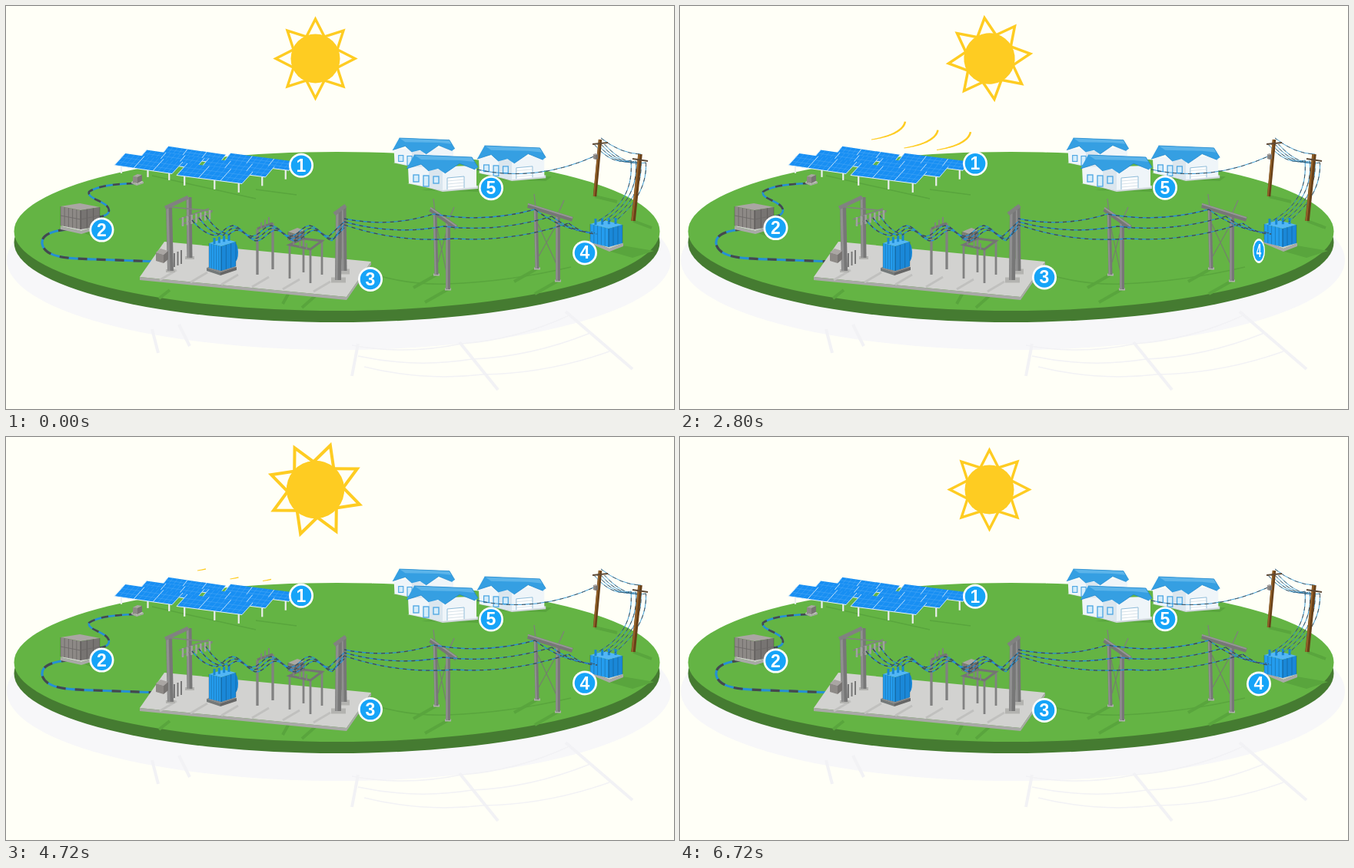
An HTML page that plays this animation: 869 by 525 pixels, repeating every 6800 ms.

```html
<!DOCTYPE html>
<html lang="en">
<head>
<meta charset="utf-8">
<title>Solar power from panel to home</title>
<style>
html,body{margin:0;width:100%;height:100%;overflow:hidden;background:#fffff7}
svg{display:block;width:100vw;height:100vh}
text{font:bold 23px "Liberation Sans",Arial,sans-serif;fill:#fff;text-anchor:middle}
</style>
</head>
<body>
<svg id="stage" viewBox="0 0 869 525"></svg>
<script>
const out = [];
const add = s => out.push(s);
const poly = (fill, pts) => add(`<polygon points="${pts}" fill="${fill}"/>`);
const line = (stroke, w, d, extra = '') => add(`<path d="${d}" fill="none" stroke="${stroke}" stroke-width="${w}" ${extra}/>`);
const oval = (fill, cx, cy, rx, ry) => add(`<ellipse cx="${cx}" cy="${cy}" rx="${rx}" ry="${ry}" fill="${fill}"/>`);
const mix = (a, b, k) => a.map((v, i) => v + (b[i] - v) * k);
const shift = (p, x, y) => [p[0] + x, p[1] + y];
const times = (n, f) => Array.from({length: n}, (_, i) => f(i));
const clamp = v => Math.min(1, Math.max(0, v));

const steel = ['#aaa6a3', '#8d8986', '#777472'];
const slab = ['#d2d2d0', '#a9a9a7', '#a9a9a7'];
const bright = ['#52b6f5', '#249def', '#1a88d8'];
const frame = '#818181', grass = '#59a53d', pale = '#f2f2f5', gold = '#fecc22';

// n upright strokes of height h spread evenly from a to b
function comb(stroke, w, a, b, n, h) {
  line(stroke, w, times(n, i => `M${mix(a, b, i / (n - 1))}v${h}`).join(''));
}

// Post with a lit left side
function post(top, foot, w, dark = '#777', light = '#909090') {
  line(dark, w, `M${top}L${foot}`);
  line(light, w * .4, `M${shift(top, -w / 4, 0)}L${shift(foot, -w / 4, 0)}`);
}

// Box seen from a corner: left, front and right points of its top, and height
function box(l, f, r, h, [top, left, right]) {
  const low = p => shift(p, 0, h);
  poly(top, [l, f, r, shift(l, r[0] - f[0], r[1] - f[1])]);
  poly(left, [l, f, low(f), low(l)]);
  poly(right, [f, r, low(r), low(f)]);
}

// Box with upright fins and terminals on top
function finned(l, f, r, h, colors, pins) {
  box(l, f, r, h, colors);
  comb('#0003', 1, l, f, 6, h);
  comb('#0003', 1, f, r, 4, h);
  if (pins) comb('#1886d2', 3, shift(l, 7, 1), shift(r, -9, -1), pins, -8);
}

// Cable of blue and dark pieces that travel along it
function cable(d, w = 1.3, dash = 5) {
  line('#2590d4', w, d);
  line('#45494b', w, d, `class="flow" data-dash="${dash}" stroke-dasharray="${dash}"`);
}

function hang(points, sag) {
  return `M${points[0]}` + points.slice(1).map((p, i) => `Q${shift(mix(points[i], p, .5), 0, sag)} ${p}`).join('');
}

// Mirror image and shadow below the disc
oval('#f7f7f9', 433, 331, 432, 117);
for (const [x, y, dx, dy] of [[190, 421, 8, 31], [225, 415, 14, 28], [458, 440, -8, 42], [590, 438, 50, 62], [728, 398, 87, 75]])
  line(pale, 4, `M${x} ${y}l${dx} ${dy}`);
for (const i of [0, 1, 2])
  line(pale, 1.5, hang([[450 + 8 * i, 442 + 14 * i], [592 + 14 * i, 440 + 20 * i], [735 + 25 * i, 402 + 24 * i]], 14));

// Disc
oval('#457b31', 430.5, 308, 420, 104);
oval('#64b444', 430.5, 293.5, 420, 103.5);
line(grass, 1.5, hang([[480, 350], [575, 362], [735, 340]], 8) + 'M190 221L325 251M325 239L378 246');
poly(grass, '97 294 122 286 139 292 117 302');
poly(grass, '780 318 802 312 843 319 815 328');
line(grass, 4, 'M816 280l24 9M766 248l29 7M213 370l-14 11M370 370l-10 18M402 378l-17 15');

// Houses
function house(x, y, k) {
  add(`<g transform="translate(${x} ${y}) scale(${k})">`);
  poly(grass, '20 46 94 48 102 42 60 40');
  poly('#cfd6da', '2 37 30 43 48 48 94 44 94 40 40 36');
  poly('#eff5f9', '3 16 92 14 92 42 48 46 30 42 4 37');
  poly('#dbe6ee', '30 18 48 20 48 46 30 42');
  poly('#359fe2', '11 0 86 3 94 16 90 19 70 11 51 24 42 18 30 21 20 12 1 18');
  poly('#5bb4ea', '11 0 86 3 90 9 70 7 20 6');
  line('#1e86cc', .8, 'M11 0L86 3L94 16M1 18L20 12L30 21M51 24L70 11L90 19');
  for (const i of [0, 1, 2])
    add(`<rect x="${10 + 13 * i}" y="${26 + i}" width="7" height="${i === 1 ? 14 : 9}" fill="#d5edfb" stroke="#4aa5e2" stroke-width="1.3"/>`);
  poly('#fff', '54 30 76 28 76 43 54 45');
  line('#8dbbd8', 1, 'M54 45V30L76 28V43');
  for (const i of [1, 2, 3]) line('#c4d5de', .7, `M54 ${30 + 4 * i}l22 -2`);
  add('</g>');
}
house(502, 172, .87);
house(612, 182, .96);
house(520, 194, 1);

// Solar field: three rows of two tables
function panelTable(row, col) {
  const tl = [155 + 28 * row + 81 * col, 192 - 4.6 * row + (13 - 2 * row) * col];
  const tr = shift(tl, 75 + 10 * col, 11), side = [2.5 * row - 14, 15.5 - 2 * row];
  const bl = shift(tl, ...side), br = shift(tr, ...side);
  for (const k of [.12, .58, .95]) line('#eceeee', 2.2, `M${mix(bl, br, k)}v${9 + 3 * col}`);
  poly('#188ff3', [tl, tr, br, bl]);
  for (let i = 0; i <= 12; i++) {
    const seam = i % 4 === 0;
    line(seam ? '#c9e5fb' : '#4ea9f5', seam ? 1 : .5, `M${mix(tl, tr, i / 12)}L${mix(bl, br, i / 12)}`);
  }
  for (const k of [.33, .66]) line('#4ea9f5', .5, `M${mix(tl, bl, k)}L${mix(tr, br, k)}`);
  line('#e4f1fa', 1, `M${bl}L${br}`);
}
for (const row of [2, 1, 0]) for (const col of [0, 1]) panelTable(row, col);

// Collector boxes and ground cable
cable('M166 231C142 232 120 234 108 242C105 252 133 254 134 266C134 272 128 274 120 275', 2.6, 9);
cable('M80 291C55 293 43 301 48 313C55 329 86 329 115 330L198 333', 3.2, 12);
box([163, 229], [170, 232], [179, 229], 2, slab);
box([165, 222], [171, 223], [177, 220], 8, steel);
box([71, 287], [98, 293], [124, 285], 4, slab);
finned([71, 261], [97, 266], [122, 262], 25, steel);
line('#6b6866', .8, 'M71 273L97 278L122 273');

// Substation pad
box([174, 353], [443, 379], [475, 333], 4, slab);
for (let i = 0; i < 6; i++) line('#c0c0be', 3, `M${222 + 40 * i} ${344 + 3 * i}l-22 13`);

// Entry gantry
line('#b2b2af', 4, 'M208 345h12M233 328h12');
post([238, 249], [239, 328], 7);
post([212, 260], [214, 345], 8);
line(frame, 5, 'M207 263L237 249');
line(frame, 1.5, 'M214 262L269 267M225 278L264 264M228 285L268 268');
comb('#a0a0a0', 2.5, [230, 275], [265, 266], 7, 12);
comb('#777', 2, [219, 322], [228, 318], 3, 18);
box([195, 321], [205, 324], [211, 319], 11, steel);

// Main transformer
box([261, 341], [279, 347], [300, 340], 4, ['#888', '#747979', '#666']);
oval('#1787d8', 298, 321, 4, 12);
finned([264, 309], [280, 313], [299, 307], 32, bright, 4);

// Switch frames: four legs under a rectangular beam
function table(a, b, c, d, legs) {
  for (const p of [d, a, c, b]) line(frame, 2.8, `M${p}v${legs}`);
  line('#747474', 3, `M${[a, b, c, d].join('L')}Z`);
  comb(frame, 1.8, shift(a, 5, 0), shift(b, -5, 0), 3, -8);
}
table([327, 290], [347, 283], [347, 283], [327, 290], 60);
table([369, 311], [396, 317], [411, 306], [387, 303], 44);
finned([367, 294], [376, 297], [388, 292], 11, steel);

// Line gantries
line('#b3b3b0', 7, 'M423 357h19M431 346h16');
post([439, 261], [440, 345], 7);
post([433, 267], [432, 357], 8);
line(frame, 5, 'M427 271L442 260');
function gantry(a, b, depth) {
  const footA = shift(a, 2, depth), footB = shift(b, 0, depth + 7);
  for (const foot of [footA, footB]) {
    line(grass, 4, `M${foot}l-30 17`);
    line('#b0b0ad', 3, `M${shift(foot, -4, 0)}h8`);
  }
  line('#74806d', 1.2, `M${shift(a, 3, 22)}L${shift(footB, -2, -22)}M${shift(b, -2, 14)}L${shift(footA, 2, -16)}`);
  line('#7d827a', 1.3, `M${a}l-2 -17M${b}l8 -18`);
  post(a, footA, 5);
  post(b, footB, 6);
  const ends = [mix(a, b, -.35), mix(a, b, 1.65)].map(p => shift(p, 0, 1));
  line('#767676', 6, `M${ends[0]}L${ends[1]}`);
  line('#979797', 2, `M${shift(ends[0], 0, -2)}L${shift(ends[1], 0, -2)}`);
}
gantry([558, 268], [575, 280], 82);
gantry([689, 262], [718, 271], 80);

// Step-down transformer
box([759, 305], [785, 316], [803, 309], 4, slab);
finned([760, 284], [784, 290], [802, 285], 24, bright, 4);

// Overhead lines, three in parallel
for (const i of [0, 1, 2]) {
  cable(hang([[440, 277 + 4 * i], [556 + 13 * i, 271 + 16 * i], [688 + 22 * i, 265 + 9 * i]], 15));
  cable(hang([[688 + 22 * i, 265 + 9 * i], [763 + 3 * i, 295 + i]], 13 - 3 * i));
  cable(hang([[242 + 9 * i, 279 - 3 * i], [275 + 7 * i, 299 - i]], 10));
  const wave = times(30, n => {
    const x = 275 + 7 * i + 5 * n;
    return [x, 293 + 3 * i + 7 * Math.cos((x - 320 - 3 * i) * Math.PI / 25)];
  }).filter(p => p[0] < 428);
  cable(`M${wave.join('L')}L440 ${281 + 4 * i}`);
}

// Service lines between poles and houses
for (const i of [0, 1, 2, 3]) {
  const top = [813 + 6.5 * i, 201 + i];
  cable(`M${top}C${816 + 6 * i} 240 ${800 + 4 * i} 264 ${768 + 8 * i} 281`, .9);
  cable(hang([[765 + 4.5 * i, 180], top], 18), .8);
}
cable(hang([[774, 172], [826, 193]], 10), .8);
cable(hang([[613, 213], [767, 195]], 26), .9);

// Wooden poles
function woodPole(top, foot, w, tilt) {
  post(top, foot, w, '#684018', '#94622a');
  line('#5e4a36', 1.8, `M${shift(top, -10, 6)}l20 ${tilt}`);
}
woodPole([773, 174], [766, 248], 4.5, -2);
woodPole([825, 193], [816, 280], 5.5, 3);
box([764, 193], [767, 194], [770, 193], 6, steel);

// Sun
add('<g id="sun">');
for (let a = 0; a < 360; a += 45)
  line(gold, 3.4, 'M-12 -28L0 -51.5L12 -28', `transform="rotate(${a})"`);
add(`<circle r="32" fill="${gold}"/></g>`);

// Heat rays
add('<path id="guide" fill="none" d="M337 116C308 118 290 130 293 146C295 161 275 170 249 174"/>');
for (const [x, y] of [[0, 0], [42.5, 11], [85, 13.5]])
  add(`<path class="ray" fill="${gold}" transform="translate(${x} ${y})"/>`);

// Number badges
const spots = [[384, 206.8], [124.5, 290.6], [474, 355], [753, 320.5], [631, 235.7]];
spots.forEach((_, i) => add(`<g class="badge"><circle r="16" fill="#fff"/><circle r="13.3" fill="#16a4f8"/><text y="8">${i + 1}</text></g>`));

const stage = document.getElementById('stage');
stage.innerHTML = out.join('');
const all = s => [...stage.querySelectorAll(s)];
const [sun] = all('#sun'), [guide] = all('#guide');
const flows = all('.flow'), rays = all('.ray'), badges = all('.badge');
const reach = guide.getTotalLength();

// Stretch of the guide between two fractions, thick in the middle of the guide
function rayShape(tail, head) {
  if (head - tail < .01) return '';
  const left = [], right = [];
  for (let i = 0; i <= 30; i++) {
    const u = tail + (head - tail) * i / 30;
    const at = d => guide.getPointAtLength(u * reach + d);
    const p = at(0), a = at(-1), b = at(1);
    const w = (.45 + .85 * Math.sin(Math.PI * u)) / Math.hypot(b.x - a.x, b.y - a.y);
    const dx = (a.y - b.y) * w, dy = (b.x - a.x) * w;
    left.push([p.x + dx, p.y + dy]);
    right.unshift([p.x - dx, p.y - dy]);
  }
  return `M${left.concat(right).join('L')}Z`;
}

function draw(t) {
  // The sun swells during one half of its turn and shrinks during the other
  const turn = t % 3360 / 1680, half = Math.floor(turn), p = turn - half;
  const swell = half ? (1 - p) ** 1.6 : p ** .8;
  sun.setAttribute('transform', `translate(402.5 68.5) rotate(${22.5 * (half + p ** .9)}) scale(${1 + .21 * swell})`);

  const beat = t % 1680;
  const shape = rayShape(clamp((beat - 745) / 680), clamp((beat - 20) / 960));
  rays.forEach(r => r.setAttribute('d', shape));

  flows.forEach(f => f.setAttribute('stroke-dashoffset', -2 * f.dataset.dash * t / 480));

  const wave = lead => Math.cos(2 * Math.PI * (t / 2240 - lead));
  const bob = wave(.857) * Math.abs(wave(.857)) * 2.5;
  const squash = 1 - .5 * Math.sin(Math.PI * clamp((t - 2640) / 320));
  badges.forEach((b, i) => {
    const [x, y] = spots[i];
    const lift = i === 4 ? 1.8 * wave(.1) : bob;
    b.setAttribute('transform', `translate(${x} ${y + lift}) scale(${i === 3 ? squash : 1} 1)`);
  });
}

const start = performance.now();
function tick() {
  const t = (performance.now() - start) % 6800;
  draw(Math.floor(t / 80) * 80 % 6720);
  requestAnimationFrame(tick);
}
tick();
</script>
</body>
</html>
```
